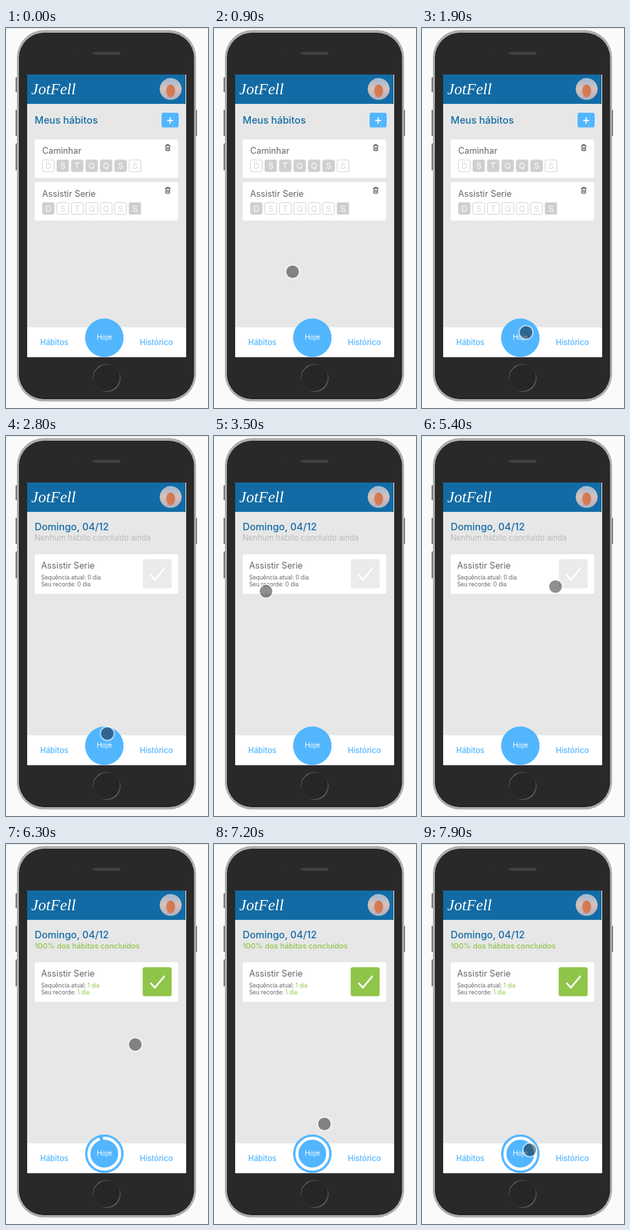
An HTML page for the animation above (8 s loop, 296 px wide and 556 px high).

```html
<!DOCTYPE html>
<html lang="pt-BR">
<head>
<meta charset="utf-8">
<title>Hábitos</title>
<style>
  html, body { margin: 0; width: 100%; height: 100%; overflow: hidden; background: #f9fbfa; }
  svg { display: block; width: 296px; height: 556px; }
  text { font-family: Inter, "Open Sans", sans-serif; font-size: 12.7px; fill: #666; }
  .brand { font: italic 23px "Liberation Serif", "Noto Serif", serif; fill: #fff; }
  .title { font-size: 14.4px; font-weight: 500; fill: #126ba5; }
  .sub { font-size: 11.4px; fill: #bababa; }
  .small { font-size: 8.4px; }
  .nav { font-size: 11.3px; font-weight: 500; fill: #52b6ff; }
  .now { font-size: 10.3px; fill: #fff; text-anchor: middle; }
  .day { font-size: 12px; text-anchor: middle; }
  .box { fill: #ebebeb; }
  .done .sub { font-size: 11px; font-weight: 500; }
  .done .sub, .done .count, .done .box { fill: #8fc549; }
</style>
</head>
<body>
<svg viewBox="0 0 296 556">
  <defs>
    <linearGradient id="sky" x2="0" y2="1">
      <stop offset="0" stop-color="#9fbbd8"/>
      <stop offset=".5" stop-color="#d9c0ba"/>
      <stop offset="1" stop-color="#a4b0c4"/>
    </linearGradient>
    <linearGradient id="rim" x2="1" y2="1">
      <stop offset="0" stop-color="#777"/>
      <stop offset=".35" stop-color="#2a2a2a"/>
      <stop offset=".6" stop-color="#2a2a2a"/>
      <stop offset="1" stop-color="#909090"/>
    </linearGradient>
    <path id="trash" d="M0 2H8M2.7 2V.5H5.3V2M1 2.5L1.4 9.5H6.6L7 2.5M3 4V8M5 4V8"
      fill="none" stroke="#444"/>
  </defs>

  <rect width="296" height="556" fill="#f9fbfa"/>
  <rect width="296" height="1" fill="#e4e5e5"/>

  <!-- phone -->
  <path d="M15.5 72V94M15.5 120V158M15.5 169V208M278.5 120V158" stroke="#777" stroke-width="3"/>
  <rect x="16" y="3" width="262.5" height="543.5" rx="40" fill="#adadae"/>
  <rect x="19" y="7" width="256.5" height="536" rx="37" fill="#1e1e1e"/>
  <rect x="20" y="8" width="254.5" height="534" rx="36" fill="#292929"/>
  <circle cx="105" cy="37.5" r="2" fill="#151515" stroke="#454545" stroke-width=".7"/>
  <rect x="127" y="35" width="41" height="4" rx="2" fill="#414141"/>
  <circle cx="147.5" cy="512" r="19.7" fill="#262626" stroke="url(#rim)" stroke-width="1.4"/>

  <!-- screen -->
  <rect x="31" y="68" width="233" height="413.4" fill="#e7e7e7"/>
  <rect x="31" y="68" width="232" height="43" fill="#126ba5"/>
  <text class="brand" x="37" y="97">JotFell</text>
  <circle cx="241.3" cy="89.3" r="16" fill="url(#sky)"/>
  <ellipse cx="241.3" cy="92" rx="6.5" ry="9.5" fill="#d47b55"/>

  <g id="habits">
    <text class="title" x="42" y="140">Meus hábitos</text>
    <rect x="228" y="124" width="25" height="21.5" rx="3" fill="#52b6ff"/>
    <path d="M236 135.3H245M240.5 130.8V139.8" stroke="#fff" stroke-width="1.7"/>
  </g>

  <g id="today">
    <text class="title" x="42" y="138">Domingo, 04/12</text>
    <text class="sub" id="status" x="42" y="153"></text>
    <rect x="42" y="173" width="210.5" height="58" rx="3" fill="#fff"/>
    <text x="51.5" y="194">Assistir Serie</text>
    <text class="small" x="51.5" y="210">Sequência atual: <tspan class="count"></tspan></text>
    <text class="small" x="51.5" y="220">Seu recorde: <tspan class="count"></tspan></text>
    <rect class="box" x="200.3" y="180.3" width="42.4" height="42.4" rx="3"/>
    <path d="M211.5 203L218 210.3L232.5 193" fill="none" stroke="#fff" stroke-width="2.6"/>
  </g>

  <rect x="31" y="438" width="233" height="43.4" fill="#fff"/>
  <text class="nav" x="50" y="464">Hábitos</text>
  <text class="nav" x="196" y="464">Histórico</text>
  <g transform="translate(144.1 453.2)">
    <circle r="28.2" fill="#52b6ff"/>
    <circle id="ring" r="22.6" fill="none" stroke="#fff" stroke-width="4.5"
      stroke-linecap="round" pathLength="100" transform="rotate(-90)"/>
    <text class="now" y="2.8">Hoje</text>
  </g>

  <g id="cursor">
    <circle r="9.4" fill="#000" fill-opacity=".44"/>
    <circle r="10.1" fill="none" stroke="#fff" stroke-opacity=".55" stroke-width="1.8"/>
  </g>
</svg>

<script>
const LOOP = 8000, STEP = 100;
const SWITCH = 2400, CHECK = 6000, RING_START = 5925, RING_TIME = 500;
const $ = id => document.getElementById(id);

const easeIn = k => k ** 3;
const easeOut = k => 1 - (1 - k) ** 2;
const easeBoth = k => k < .5 ? 2 * k * k : 1 - 2 * (1 - k) ** 2;

// Each move bends past a control point; the cursor rests between moves.
const home = [420, 0];
const moves = [
  { from: 0, to: 400, via: [269, 178], end: [118, 356], ease: easeOut },
  { from: 800, to: 1900, via: [30, 375], end: [152.5, 445.5], ease: easeBoth },
  { from: 2300, to: 3200, via: [136, 420], end: [174, 347], ease: easeIn },
  { from: 3200, to: 4100, via: [22, 158], end: [100.5, 261.5], ease: easeOut },
  { from: 4100, to: 4700, via: [117, 237], end: [133.5, 213], ease: easeBoth },
  { from: 4800, to: 5700, via: [100, 262], end: [220.5, 210], ease: easeOut },
  { from: 5900, to: 6500, via: [191, 320], end: [188.5, 288], ease: easeOut },
  { from: 6600, to: 7500, via: [182, 365], end: [148, 445], ease: easeBoth },
  { from: 7500, to: 7900, via: [165, 470], end: [158, 447.5], ease: easeBoth }
];

const progress = (t, from, to) => Math.min(1, Math.max(0, (t - from) / (to - from)));

function cursorAt(t) {
  let pos = home;
  for (const { from, to, via, end, ease } of moves) {
    if (t < from) break;
    const s = ease(progress(t, from, to)), r = 1 - s;
    pos = pos.map((p, i) => r * r * p + 2 * r * s * via[i] + s * s * end[i]);
  }
  return pos;
}

function habitCard(name, y, picked) {
  const days = [..."DSTQQSS"].map((day, i) => {
    const on = picked[i] === "x", x = 53.5 + i * 21.15;
    return `<rect x="${x}" y="${y + 30}" width="17.2" height="17.2" rx="2"
      fill="${on ? "#cfcfcf" : "#fff"}" stroke="#d4d4d4"/>
      <text class="day" x="${x + 8.6}" y="${y + 43}" style="fill:${on ? "#fff" : "#d8d8d8"}">${day}</text>`;
  });
  return `<rect x="42" y="${y}" width="210.5" height="56.3" rx="3" fill="#fff"/>
    <text x="53" y="${y + 21}">${name}</text>
    <use href="#trash" x="233" y="${y + 7}"/>${days.join("")}`;
}

$("habits").insertAdjacentHTML("beforeend",
  habitCard("Caminhar", 163, "-xxxxx-") + habitCard("Assistir Serie", 225.5, "x-----x"));

const counts = document.querySelectorAll(".count");
const show = (id, on) => $(id).style.display = on ? "" : "none";

function draw(t) {
  const done = t >= CHECK;
  show("habits", t < SWITCH);
  show("today", t >= SWITCH);
  show("ring", done);
  $("today").classList.toggle("done", done);
  $("status").textContent = done ? "100% dos hábitos concluídos" : "Nenhum hábito concluído ainda";
  counts.forEach(c => c.textContent = done ? "1 dia" : "0 dia");

  const filled = easeOut(progress(t, RING_START, RING_START + RING_TIME));
  $("ring").setAttribute("stroke-dasharray", `${100 * filled} 100`);
  $("cursor").setAttribute("transform", `translate(${cursorAt(t)})`);
}

const start = performance.now();
function tick() {
  const t = (performance.now() - start) % LOOP;
  draw(Math.floor(t / STEP) * STEP);
  requestAnimationFrame(tick);
}
tick();
</script>
</body>
</html>
```
